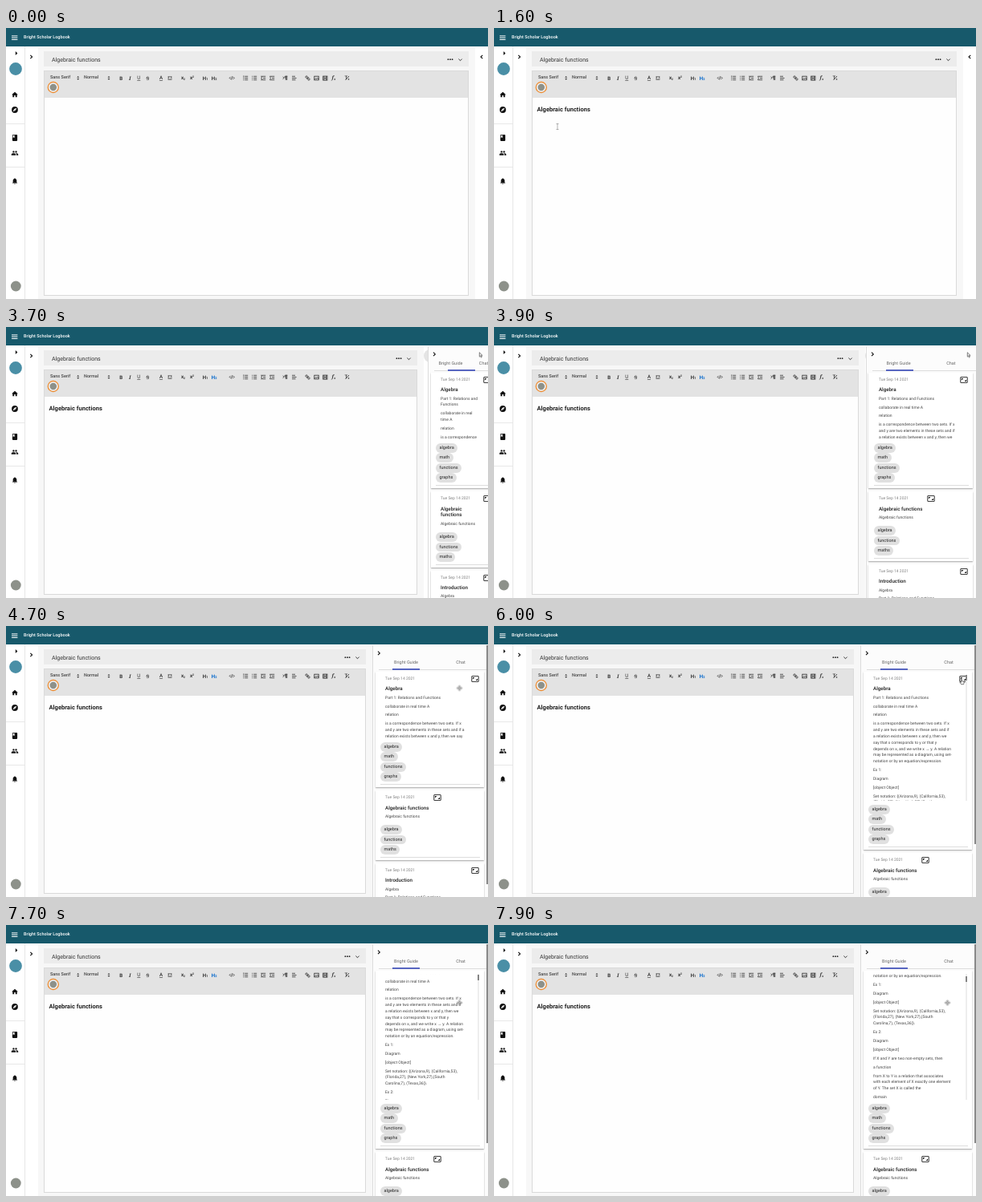
These frames come from a looping animation (600x338 px, 8000 ms). An HTML page:

```html
<!DOCTYPE html>
<html lang="en">
<head>
<meta charset="utf-8">
<title>Notebook editor</title>
<style>
@property --p { syntax: "<number>"; inherits: true; initial-value: 0; }
html, body { margin: 0; width: 100%; height: 100%; overflow: hidden; background: #fff; }
#stage {
  --edge: calc(584px - 128px * var(--p));
  --w: calc(36px + 108px * var(--p));
  position: relative; width: 600px; height: 338px; overflow: hidden; background: #fff;
  font: 5px/7.8px Roboto, sans-serif; color: #333; text-rendering: geometricPrecision;
}
#stage, .anim { animation: 8s step-end -20ms infinite; }
#stage { animation-name: slide; }
#stage div, #stage svg { position: absolute; box-sizing: border-box; }
svg { overflow: visible; left: 0; top: 0; }
svg text { text-anchor: middle; font-weight: 700; font-size: 6.2px; fill: #333; }

.top { left: 0; top: 0; width: 600px; height: 23px; background: #17596b; }
.brand { left: 22px; top: 9.4px; color: #fff; font-size: 5.5px; font-weight: 500; white-space: pre; }
.nav { left: 0; top: 23px; width: 24px; height: 315px; border-right: 1px solid #e6e6e6; }
.main { left: 40px; top: 24px; width: calc(var(--edge) - 40px); height: 314px; background: #f7f7f7; }
.head { left: 7px; right: 8px; top: 5px; height: 19px; background: #ececec; }
.head b { position: absolute; left: 10px; top: 7.2px; font-size: 7.05px; font-weight: 400; white-space: pre; }
.editor { left: 7px; right: 8px; top: 29px; height: 280.5px; background: #fefefe; border: 1px solid #dadada; }
.bar { left: 0; right: 0; top: 0; height: 33px; background: #e3e3e3; }
.open { left: calc(var(--edge) + 8px); top: 36px; }
.pick { font-size: 5.5px; font-weight: 500; color: #444; top: 58.6px; white-space: pre; }
.heading { left: 53.5px; top: 97px; font-size: 7.55px; line-height: 10px; font-weight: 700; color: #222; white-space: pre; }
.caret { left: 120px; top: 96px; width: .8px; height: 10px; background: #222; }

.panel {
  left: calc(594px - 138px * var(--p)); top: 24px; width: var(--w); height: 314px;
  background: #fcfcfc; border-left: 1px solid #dcdcdc; overflow: hidden;
}
.tabs { left: 7px; right: 0; top: 17px; height: 14px; border-bottom: 1px solid #ddd; font-size: 5.5px; color: #666; }
.tabs span { position: absolute; top: 1.5px; width: 50%; text-align: center; white-space: nowrap; }
.tabs i {
  position: absolute; top: 12.4px; width: 34px; height: 1.2px; background: #5765c0;
  left: calc(25% - 17px + 27px * (1 - var(--p)));
}
.list { left: 2.5px; top: 33.1px; width: calc(var(--w) - 8.5px); }
#stage .card {
  position: relative; padding: 4px 0 6.8px 12.5px; margin-bottom: 4px; background: #fff;
  box-shadow: 0 1px 1.5px rgba(0,0,0,.35);
}
.card::after {
  content: ""; position: absolute; left: 6.5px; right: 5px; bottom: 3.6px; height: .6px; background: #ddd;
}
#stage .clip, #stage .roll { position: relative; }
.clip { max-height: 79.2px; width: calc(var(--w) - 24px); overflow: hidden; margin-bottom: 4.2px; }
.clip time, .clip h3, .clip p { position: relative; top: 2.1px; }
.clip time { display: block; margin-bottom: 5.2px; color: #808080; white-space: nowrap; }
.clip h3 { top: 1.4px; margin: 0 0 2.7px; font: 500 6.25px/7.8px Roboto, sans-serif; color: #222; width: calc(var(--w) - 41px); }
.clip p { margin: 0 0 3.1px; width: calc(var(--w) - 41px); color: #444; }
.clip svg { left: calc(min(var(--x, 112px), var(--w) - 32px) - 5px); top: 0; }
.flow { display: grid; grid-template-columns: minmax(0, 1fr); }
.flow p { grid-area: 1 / 1; }
.long { white-space: pre; }
.chip {
  display: block; position: relative; top: .5px; width: max-content; height: 11.6px; box-sizing: border-box;
  margin: 0 0 .9px -6px; padding: 1px 4.5px 0; border-radius: 6px;
  background: #e0e0e0; font-size: 5.5px; line-height: 11.6px; color: #222;
}
.track { left: 114.5px; top: 0; width: 2px; height: 157px; background: #eee; }
.thumb { left: 0; top: .3px; width: 2px; height: 6.5px; background: #858585; }
.page { left: 598px; top: 24px; width: 2px; height: 298px; background: #8a8a8a; }
.cursor { left: 0; top: 0; width: 0; height: 0; }

.a-blue { animation-name: blue; }
.a-text { animation-name: text; }
.a-caret { animation-name: caret; }
.a-hover { animation-name: hover; }
.a-panel { animation-name: panel; }
.a-page { animation-name: page; }
.a-clip { animation-name: grow; }
.a-short { animation-name: short; }
.a-long { animation-name: long; }
.a-roll { animation-name: roll; }
.a-thumb { animation-name: thumb; }
.a-cursor { animation-name: travel; }
.a-beam { animation-name: beam; }
.a-arrow { animation-name: arrow; }
.a-move { animation-name: move; }
.a-hand { animation-name: hand; }

@keyframes slide {
  0% { --p: 0 } 43.75% { --p: .06 } 45% { --p: .22 } 46.25% { --p: .5 }
  47.5% { --p: .8 } 48.75% { --p: .95 } 50%, 100% { --p: 1 }
}
@keyframes blue { 0% { fill: #333 } 15%, 100% { fill: #06c } }
@keyframes text { 0% { opacity: 0 } 20%, 100% { opacity: 1 } }
@keyframes caret { 0% { opacity: 0 } 21.25% { opacity: 1 } 41.25%, 100% { opacity: 0 } }
@keyframes hover { 0% { opacity: 0 } 40%, 100% { opacity: 1 } }
@keyframes panel { 0% { opacity: 0 } 43.75%, 100% { opacity: 1 } }
@keyframes page { 0% { opacity: 0; height: 298px } 50% { opacity: 1; height: 298px } 75%, 100% { opacity: 1; height: 248px } }
@keyframes grow { 0% { max-height: 79.2px } 75%, 100% { max-height: 157.2px } }
@keyframes short { 0% { opacity: 1 } 75%, 100% { opacity: 0 } }
@keyframes long { 0% { opacity: 0 } 75%, 100% { opacity: 1 } }
@keyframes roll {
  0% { transform: none } 95% { transform: translateY(-9px) } 96.25% { transform: translateY(-29.6px) }
  97.5% { transform: translateY(-68px) } 98.75%, 100% { transform: translateY(-104.6px) }
}
@keyframes thumb {
  0% { transform: none } 96.25% { transform: translateY(1px) }
  97.5% { transform: translateY(2px) } 98.75%, 100% { transform: translateY(3px) }
}
@keyframes travel {
  0% { transform: translate(148px, 181px) }
  3.75% { transform: translate(148px, 181px); animation-timing-function: steps(5) }
  10% { transform: translate(125px, 126px) }
  12.5% { transform: translate(96px, 123px) }
  13.75% { transform: translate(79px, 123px) }
  28.75% { transform: translate(82px, 118px) }
  30% { transform: translate(110px, 110px) }
  31.25% { transform: translate(190px, 98px) }
  32.5% { transform: translate(300px, 82px) }
  33.75% { transform: translate(410px, 68px) }
  35% { transform: translate(491px, 56px) }
  36.25% { transform: translate(535px, 47px) }
  37.5% { transform: translate(558px, 40px) }
  38.75% { transform: translate(569px, 36px) }
  40% { transform: translate(585px, 33px) }
  41.25% { transform: translate(589px, 31.5px) }
  51.25% { transform: translate(587px, 36px); animation-timing-function: steps(6) }
  58.75% { transform: translate(564.5px, 77.5px) }
  67.5% { transform: translate(567px, 76px); animation-timing-function: steps(3) }
  71.25% { transform: translate(582px, 66px) }
  91.25% { transform: translate(579px, 71px); animation-timing-function: steps(2) }
  93.75%, 100% { transform: translate(564.5px, 97px) }
}
@keyframes beam { 0% { opacity: 0 } 3.75% { opacity: 1 } 30%, 100% { opacity: 0 } }
@keyframes arrow { 0% { opacity: 0 } 30% { opacity: 1 } 55%, 100% { opacity: 0 } }
@keyframes move { 0% { opacity: 0 } 55% { opacity: 1 } 71.25% { opacity: 0 } 92.5%, 100% { opacity: 1 } }
@keyframes hand { 0% { opacity: 0 } 71.25% { opacity: 1 } 92.5%, 100% { opacity: 0 } }
</style>
</head>
<body>
<div id="stage">
  <svg width="0" height="0">
    <defs>
      <path id="rows" d="M-.8 -2.2h4M-.8 0h4M-.8 2.2h4"/>
      <path id="updown" d="M-1.5 -.6L0 -2.4 1.5 -.6zM-1.5 .6L0 2.4 1.5 .6z"/>
      <path id="expand" d="M19 12h-2v3h-3v2h5v-5zM7 9h3V7H5v5h2V9zm14-6H3c-1.1 0-2 .9-2 2v14c0 1.1.9 2 2 2h18c1.1 0 2-.9 2-2V5c0-1.1-.9-2-2-2zm0 16H3V5h18v14z"/>
    </defs>
  </svg>

  <div class="nav"></div>
  <div class="main">
    <div class="head">
      <b>Algebraic functions</b>
      <svg style="left:100%" width="1" height="1">
        <g fill="#222"><circle cx="-25.6" cy="10.2" r=".9"/><circle cx="-23" cy="10.2" r=".9"/><circle cx="-20.4" cy="10.2" r=".9"/></g>
        <path d="M-12.6 9.6l2.1 2.1 2.1-2.1" fill="none" stroke="#222" stroke-width=".9"/>
      </svg>
    </div>
    <div class="editor"><div class="bar"></div></div>
  </div>
  <div class="open">
    <svg width="1" height="1">
      <circle class="anim a-hover" r="8" fill="#e4e4e4"/>
      <path d="M1.3 -2.2L-1 0 1.3 2.2" fill="none" stroke="#111" stroke-width="1.1"/>
    </svg>
  </div>

  <div class="top"></div>
  <div class="brand">Bright Scholar Logbook</div>
  <div class="pick" style="left:55px">Sans Serif</div>
  <div class="pick" style="left:97px">Normal</div>

  <svg width="600" height="338">
    <path d="M7 9.9h7.4M7 12.2h7.4M7 14.5h7.4" stroke="#fff" stroke-width="1"/>
    <path d="M0 119.5h23M0 173.5h23" stroke="#e2e2e2" stroke-width=".8"/>
    <path d="M30.3 33.8l2.3 2.2-2.3 2.2" fill="none" stroke="#111" stroke-width="1.1"/>
    <path d="M11.8 29l2.6 2.5-2.6 2.5z" fill="#111"/>
    <circle cx="12" cy="51" r="7.9" fill="#4a8fa6"/>
    <circle cx="12.3" cy="322" r="6.4" fill="#8d918a"/>
    <circle cx="58.8" cy="74" r="6.6" fill="#ececec" stroke="#ee8a2c" stroke-width="1.2"/>
    <circle cx="58.8" cy="74" r="4.2" fill="#8d918a"/>
    <g fill="#111">
      <path transform="translate(6.3 78.5) scale(.39)" d="M10 20v-6h4v6h5v-8h3L12 3 2 12h3v8z"/>
      <path transform="translate(6.3 97.3) scale(.39)" fill-rule="evenodd" d="M12 2a10 10 0 1 0 0 20 10 10 0 0 0 0-20zm2.2 12.2L6 18l3.8-8.2L18 6zM12 10.9a1.1 1.1 0 1 0 0 2.2 1.1 1.1 0 0 0 0-2.2z"/>
      <path transform="translate(6.3 132.3) scale(.39)" d="M18 2H6c-1.1 0-2 .9-2 2v16c0 1.1.9 2 2 2h12c1.1 0 2-.9 2-2V4c0-1.1-.9-2-2-2zM6 4h5v8l-2.5-1.5L6 12V4z"/>
      <path transform="translate(6.3 151.3) scale(.39)" d="M16 11a3 3 0 1 0 0-6 3 3 0 0 0 0 6zm-8 0a3 3 0 1 0 0-6 3 3 0 0 0 0 6zm0 2c-2.3 0-7 1.2-7 3.5V19h14v-2.5C15 14.2 10.3 13 8 13zm8 0l-1 .1c1.2.8 2 1.9 2 3.4V19h6v-2.5c0-2.3-4.7-3.5-7-3.5z"/>
      <path transform="translate(6.3 186.2) scale(.39)" d="M12 22c1.1 0 2-.9 2-2h-4c0 1.1.9 2 2 2zm6-6v-5c0-3.1-1.6-5.6-4.5-6.3V4a1.5 1.5 0 0 0-3 0v.7C7.6 5.4 6 7.9 6 11v5l-2 2v1h16v-1z"/>
    </g>

    <g transform="translate(0 .3)">
      <g fill="#333"><use href="#updown" x="89.7" y="62"/><use href="#updown" x="128" y="62"/></g>
      <text x="143.3" y="64.3">B</text>
      <text x="154.3" y="64.3" font-style="italic" font-family="Noto Serif, serif">I</text>
      <text x="165.3" y="64" style="font-weight:400" text-decoration="underline">U</text>
      <text x="176.3" y="64.3" style="font-weight:400" text-decoration="line-through">S</text>
      <text x="193" y="64" style="font-weight:500" text-decoration="underline">A</text>
      <rect x="201.6" y="59.7" width="4.8" height="5" fill="#777"/>
      <text x="204" y="64" style="font-size:4.8px;fill:#fff">A</text>
      <text x="220.5" y="64.2">x<tspan dy=".8" font-size="3.5">2</tspan></text>
      <text x="231.5" y="64.2">x<tspan dy="-2" font-size="3.5">2</tspan></text>
      <text x="248.2" y="64.3">H<tspan font-size="4">1</tspan></text>
      <text x="259.2" y="64.3" class="anim a-blue">H<tspan font-size="4">2</tspan></text>
      <text x="408" y="64" font-style="italic" font-family="Noto Serif, serif">f<tspan dy=".8" font-size="4">x</tspan></text>
      <text x="424.5" y="64.2" style="font-weight:500">T<tspan dy=".5" font-size="4">x</tspan></text>
      <g fill="none" stroke="#333" stroke-width=".85">
        <path d="M279.7 60.6l-1.5 1.5 1.5 1.5M282.7 60.6l1.5 1.5-1.5 1.5M281.7 60l-1 4.2"/>
        <use href="#rows" x="298" y="62.2"/><use href="#rows" x="309" y="62.2"/>
        <path d="M295.8 59.2v1.7M295.2 62.2h1.2M295.2 64.4h1.2M306.2 60h1M306.2 62.2h1M306.2 64.4h1"/>
        <path d="M317.2 60h6M320 62.2h3.2M317.2 64.4h6M319 61l-1.5 1.2 1.5 1.2"/>
        <path d="M328.2 60h6M331 62.2h3.2M328.2 64.4h6M328.4 61l1.5 1.2-1.5 1.2"/>
        <path d="M348.3 59.7v5M349.7 59.7v5M350.3 59.8h-2.3a1 1 0 0 0 0 2.2h.3M344.6 60.7l1.5 1.3-1.5 1.3"/>
        <path d="M356 60h4M356 62.2h5.5M356 64.4h4.5"/>
        <g transform="rotate(45 375.5 62.2)">
          <rect x="372.3" y="61" width="3.2" height="2.4" rx="1.2"/><rect x="375.5" y="61" width="3.2" height="2.4" rx="1.2"/><path d="M374.3 62.2h2.5"/>
        </g>
        <rect x="383.8" y="59.9" width="5.4" height="4.7"/>
        <path d="M384 64l1.7-1.7 1 .8 1.2-1.2 1.3 1.8"/>
        <rect x="394.7" y="59.8" width="5.2" height="5"/>
        <path d="M396 59.8v5M398.6 59.8v5M396 62.3h2.6"/>
        <path d="M422.5 64.7l4.5-5"/>
      </g>
    </g>
  </svg>

  <div class="heading anim a-text">Algebraic functions</div>
  <div class="caret anim a-caret"></div>

  <div class="panel anim a-panel">
    <svg width="1" height="1"><path d="M6 7.7l2.3 2.2L6 12.1" fill="none" stroke="#111" stroke-width="1.1"/></svg>
    <div class="tabs"><span>Bright Guide</span><span style="left:50%">Chat</span><i></i></div>
    <div class="list">
      <div class="card">
        <div class="clip anim a-clip">
          <div class="roll anim a-roll">
            <time>Tue Sep 14 2021</time>
            <svg width="10" height="10" viewBox="0 0 24 24"><use href="#expand"/></svg>
            <h3>Algebra</h3>
            <p>Part 1: Relations and Functions</p>
            <p>collaborate in real time A</p>
            <p>relation</p>
            <section class="flow">
              <p class="anim a-short">is a correspondence between two sets. If x and y are two elements in these sets and if a relation exists between x and y, then we say that x corresponds to y</p>
              <p class="long anim a-long">is a correspondence between two sets. If x
and y are two elements in these sets and if
a relation exists between x and y, then we
say that x corresponds to y or that y
depends on x, and we write x → y. A relation
may be represented as a diagram, using set-
notation or by an equation/expression.</p>
            </section>
            <section class="long anim a-long"><p>Ex 1:</p><p>Diagram</p><p>[object Object]</p><p>Set notation: {(Arizona,9), (California,53),
(Florida,27), (New York,27),(South
Carolina,7), (Texas,36)}.</p><p>Ex 2:</p><p>Diagram</p><p>[object Object]</p><p>If X and Y are two non-empty sets, then</p><p>a function</p><p>from X to Y is a relation that associates
with each element of X exactly one element
of Y. The set X is called the</p><p>domain</p></section>
          </div>
          <div class="track anim a-long"><div class="thumb anim a-thumb"></div></div>
        </div>
        <span class="chip">algebra</span><span class="chip">math</span><span class="chip">functions</span><span class="chip">graphs</span>
      </div>
      <div class="card">
        <div class="clip" style="--x:65px">
          <time>Tue Sep 14 2021</time>
          <svg width="10" height="10" viewBox="0 0 24 24"><use href="#expand"/></svg>
          <h3>Algebraic functions</h3>
          <p>Algebraic functions</p>
        </div>
        <span class="chip">algebra</span><span class="chip">functions</span><span class="chip">maths</span>
      </div>
      <div class="card">
        <div class="clip">
          <time>Tue Sep 14 2021</time>
          <svg width="10" height="10" viewBox="0 0 24 24"><use href="#expand"/></svg>
          <h3>Introduction</h3>
          <p>Algebra</p>
          <p>Part 1: Relations and Functions</p>
        </div>
      </div>
    </div>
  </div>
  <div class="page anim a-page"></div>

  <div class="cursor anim a-cursor">
    <svg width="1" height="1">
      <path class="anim a-beam" d="M-1.5 -3.5h3M0 -3.5v7M-1.5 3.5h3" stroke="#666" stroke-width=".5" fill="none"/>
      <path class="anim a-arrow" d="M.3 .3v5.2l1.2-1.1.9 2 .9-.4-.9-1.9h1.7z" fill="#fff" stroke="#222" stroke-width=".6"/>
      <path class="anim a-move" d="M0 -3.5l1.3 1.5H.5v1.5H2v-.8L3.5 0 2 1.3V.5H.5V2h.8L0 3.5-1.3 2h.8V.5H-2v.8L-3.5 0-2 -1.3v.8h1.5V-2h-.8z" fill="#fff" stroke="#555" stroke-width=".5"/>
      <path class="anim a-hand" d="M-.6 .6q.6-.9 1.2 0v2.2l2.2.6q.5.2.4.8l-.5 2.5H-.4L-2 4.5q0-.8.7-.6l.7.6z" fill="#fff" stroke="#222" stroke-width=".6"/>
    </svg>
  </div>
</div>
</body>
</html>
```
